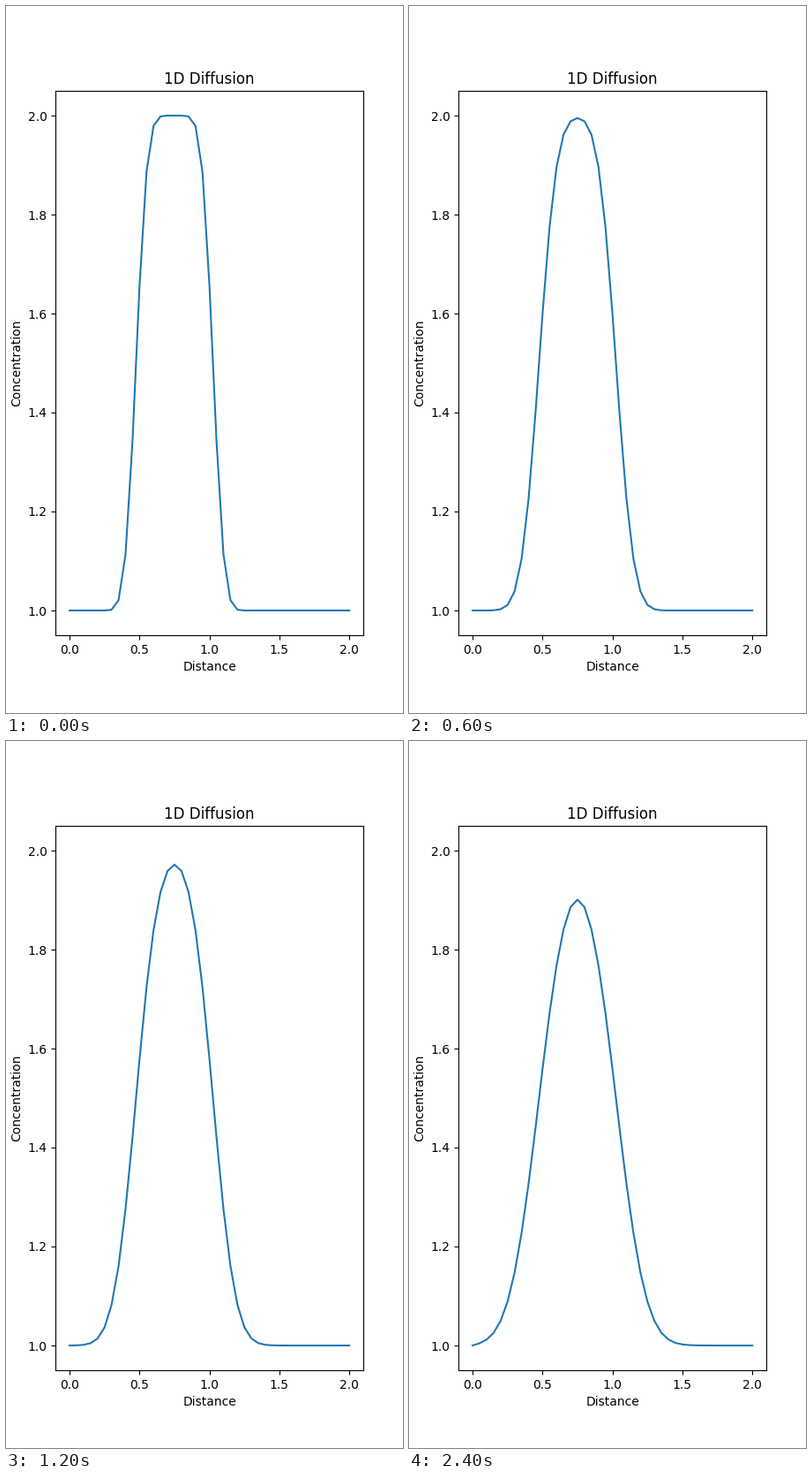
Recreate the animation shown at these times as a matplotlib script. Size 450 px wide and 800 px high, loop 2500 ms.

```python
import matplotlib.pyplot as plt
import numpy as np
from matplotlib.animation import FuncAnimation

NX = 41
FRAMES = 25
INTERVAL = 100  # ms
FIRST_STEP = 4  # time steps already done when the loop starts
SIGMA = 0.2     # nu * dt / dx**2


def initial():
    u = np.ones(NX)
    u[10:21] = 2
    return u


def concentration(steps):
    u = initial()
    for _ in range(steps):
        u[1:-1] += SIGMA * (u[2:] - 2 * u[1:-1] + u[:-2])
    return u


x = np.linspace(0, 2, NX)
fig, ax = plt.subplots(figsize=(4.5, 8), dpi=100)
line, = ax.plot(x, initial())
ax.set_xlim(-0.1, 2.1)
ax.set_ylim(0.95, 2.05)
ax.set_title("1D Diffusion")
ax.set_xlabel("Distance")
ax.set_ylabel("Concentration")


def update(frame):
    line.set_ydata(concentration(FIRST_STEP + frame))
    return line,


anim = FuncAnimation(fig, update, frames=FRAMES, interval=INTERVAL,
                     repeat=True, repeat_delay=0)
plt.show()
```
